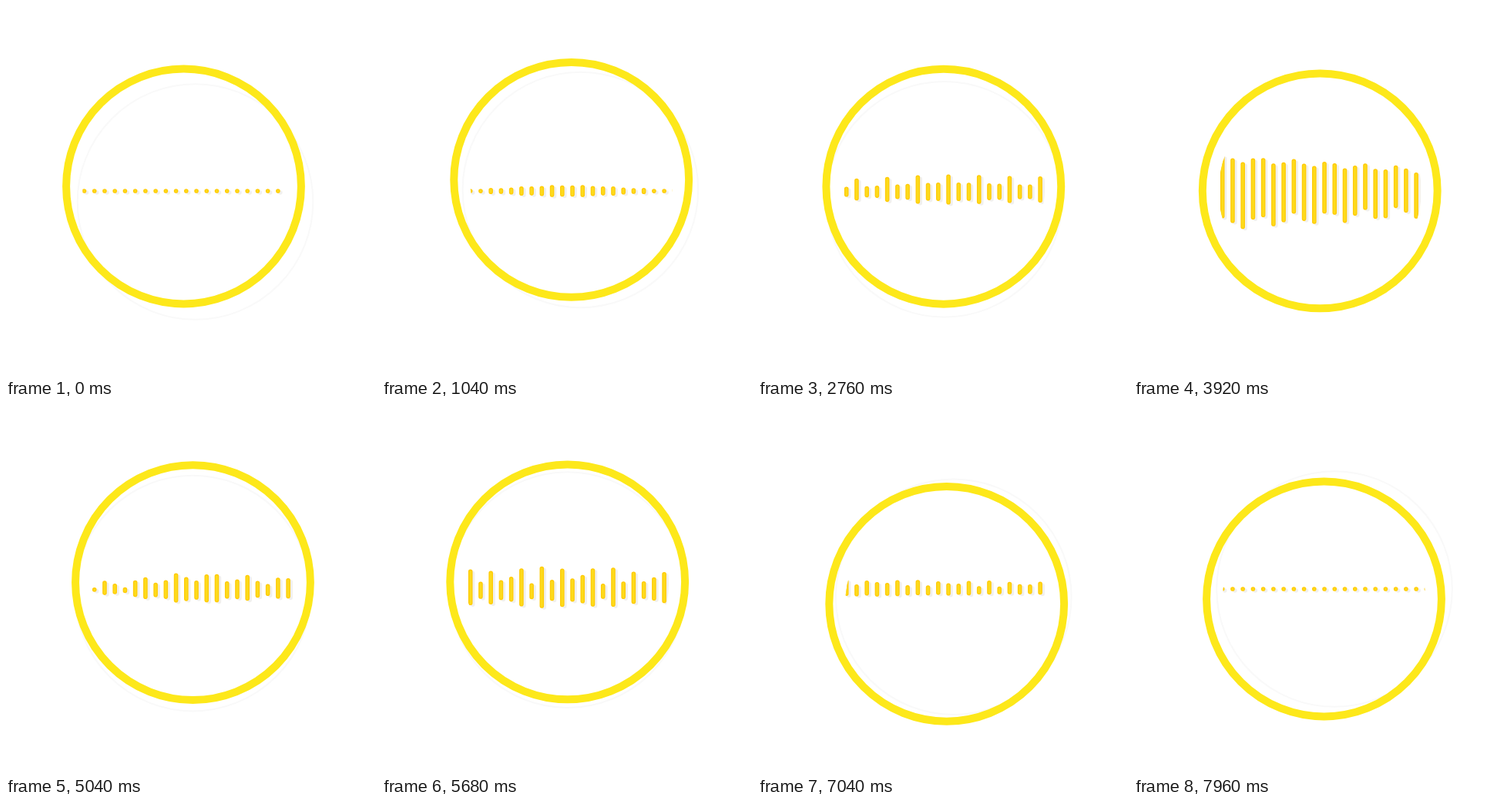
Animation of 480x480 px, one loop 8 s. Source, as an HTML page with a canvas:

```html
<!DOCTYPE html>
<html>
<head>
<meta charset="utf-8">
<style>
html, body { margin: 0; width: 100%; height: 100%; overflow: hidden; background: #fff; }
canvas { display: block; }
</style>
</head>
<body>
<canvas id="stage" width="480" height="480"></canvas>
<script>
const ctx = document.getElementById('stage').getContext('2d');
const LOOP = 8000, STEP = 40, BARS = 22, MID = 240, WIDTH = 5.6, TAU = 2 * Math.PI;

// Turning points [time, value] of the ring and of its shadow's offset
const ringX = [[0, 230.5], [1300, 247.3], [3300, 239.5], [4700, 243.7], [5480, 240.6], [7960, 246.5]];
const ringY = [[0, 234], [1300, 224.5], [3800, 240], [5480, 230], [7400, 262], [7960, 253]];
const shadeX = [[0, 15], [3400, -0.5], [5600, 0], [7960, 13.5]];
const shadeY = [[0, 20], [1100, 13], [2600, 17], [3900, 3], [5040, 14], [7700, -13]];

// Half heights run from left to right with a bulge between them;
// a wave of the given period and peak adds ripple and lifts the bars.
const silent = { left: 0, right: 0, bulge: 0, period: 3, peak: 0, ripple: 0, lift: 0 };
const poses = [
  [0, silent],
  [600, silent],
  [1040, { left: 3, right: 3, bulge: 4.5, period: 3, peak: 9, ripple: 0.5, lift: 0 }],
  [2760, { left: 9, right: 12, bulge: 4, period: 3, peak: 5, ripple: 5, lift: 2 }],
  [3920, { left: 43, right: 28, bulge: 0, period: 3.4, peak: 1.2, ripple: -2, lift: 6 }],
  [5040, { left: 5, right: 11, bulge: 8, period: 3.45, peak: 16, ripple: 4, lift: 1.5 }],
  [6280, { left: 26, right: 18, bulge: 0, period: 2.33, peak: 1, ripple: 9, lift: 5 }],
  [7500, silent],
  [LOOP, silent]
];

const mix = (a, b, u) => a + (b - a) * u;

function segment(keys, t) {
  let i = 0;
  while (i < keys.length - 2 && t >= keys[i + 1][0]) i++;
  const [[t0, a], [t1, b]] = keys.slice(i, i + 2);
  return [a, b, Math.min(1, (t - t0) / (t1 - t0))];
}

function ease(keys, t) {
  const [a, b, u] = segment(keys, t);
  return mix(a, b, (1 - Math.cos(Math.PI * u)) / 2);
}

// Centre and half height of bar i
function shape(pose, i) {
  const u = (i - 1) / 19;
  const wave = Math.cos(TAU * (i - pose.peak) / pose.period);
  const bulge = pose.bulge * Math.sin(Math.PI * u) ** 2;
  return [MID - pose.lift * wave, mix(pose.left, pose.right, u) + bulge + pose.ripple * wave];
}

function barAt(i, t) {
  const [from, to, u] = segment(poses, t);
  const [midA, halfA] = shape(from, i), [midB, halfB] = shape(to, i);
  const flutter = 1 + 0.8 * u * (1 - u) * Math.sin(t / 61 + i * 2.7);
  const mid = mix(midA, midB, u);
  const half = Math.max(0, mix(halfA, halfB, u) * flutter - WIDTH / 2);
  return [101.5 + i * 13.23, mid - half, mid + half];
}

function ring(x, y, r, color, width) {
  ctx.strokeStyle = color;
  ctx.lineWidth = width;
  ctx.beginPath();
  ctx.arc(x, y, r, 0, TAU);
  ctx.stroke();
}

function strokeBars(bars, color, width, dx = 0, dy = 0) {
  ctx.strokeStyle = color;
  ctx.lineWidth = width;
  ctx.beginPath();
  for (const [x, top, end] of bars) {
    ctx.moveTo(x + dx, top + dy);
    ctx.lineTo(x + dx, end + dy + 0.01);
  }
  ctx.stroke();
}

function draw(t) {
  const x = ease(ringX, t), y = ease(ringY, t);
  ctx.fillStyle = '#fff';
  ctx.fillRect(0, 0, 480, 480);
  ring(x + ease(shadeX, t), y + ease(shadeY, t), 152.8, '#f9f9f9', 2);

  ctx.save();
  ctx.beginPath();
  ctx.arc(x, y, 131.5, 0, TAU);
  ctx.clip();
  ctx.lineCap = 'round';
  const bars = Array.from({ length: BARS }, (_, i) => barAt(i, t));
  strokeBars(bars, '#f1f0ee', 5.5, 3, 2);
  strokeBars(bars, '#ffcb08', WIDTH);
  strokeBars(bars, '#fddb1c', 3);
  ctx.restore();

  ring(x, y, 152.4, '#fde81a', 10);
}

const start = performance.now();
function frame() {
  const t = Math.max(0, performance.now() - start) % LOOP;
  draw(Math.floor(t / STEP) * STEP);
  requestAnimationFrame(frame);
}
frame();
</script>
</body>
</html>
```
